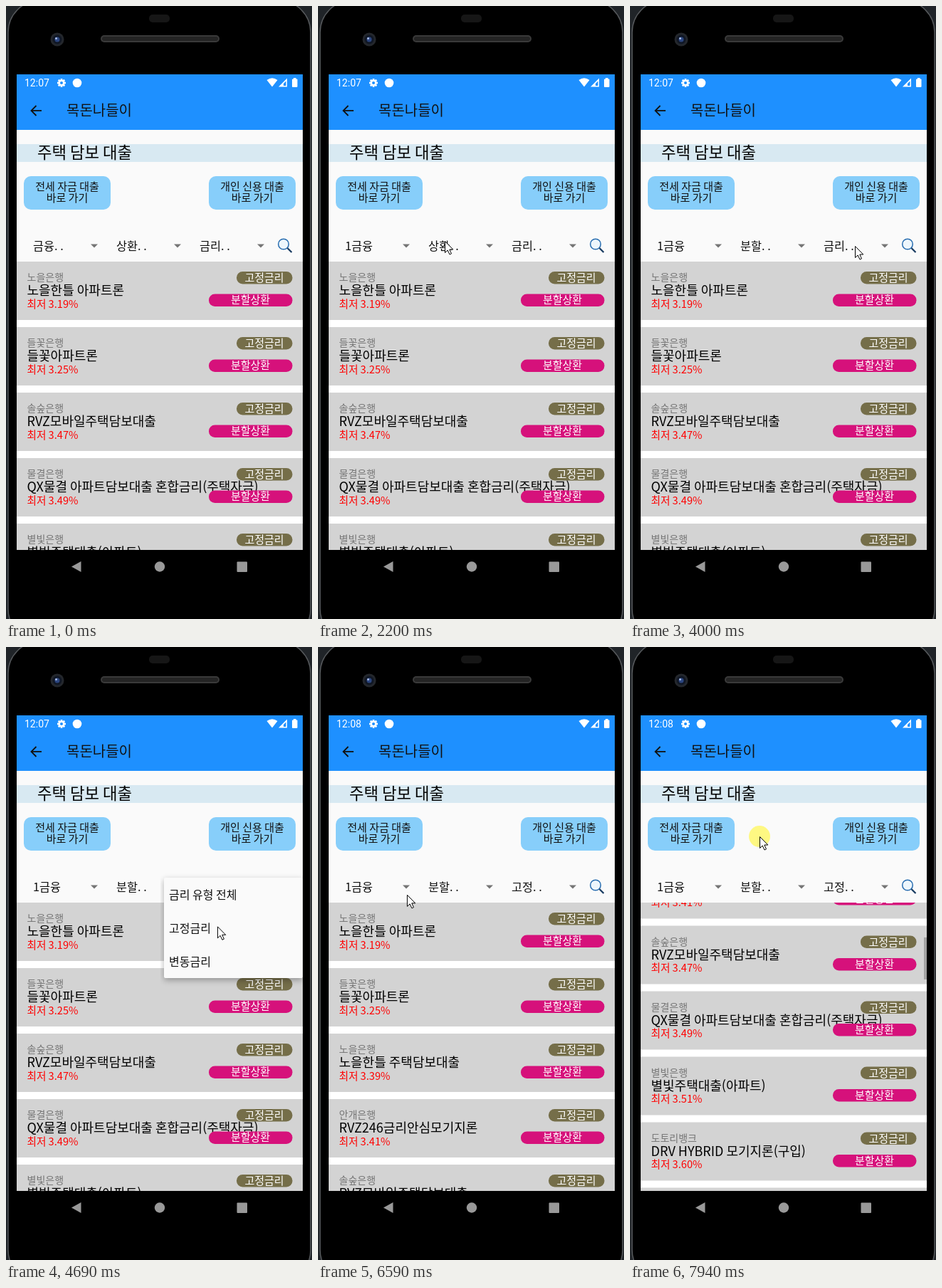
Write an HTML page with a canvas that moves like this. It is 430x861 px and loops after 8000 ms.

```html
<!DOCTYPE html>
<html lang="ko">
<head>
<meta charset="utf-8">
<style>
html, body { margin: 0; width: 100%; height: 100%; overflow: hidden; background: #000; }
canvas { display: block; }
</style>
</head>
<body>
<canvas id="stage" width="430" height="861"></canvas>
<script>
const c = document.getElementById('stage').getContext('2d');
const LOOP = 8000, STEP = 69;
const KOREAN = '"Noto Sans CJK KR", "Noto Sans CJK", sans-serif';
const ROW = 92, LIST_TOP = 359, SCREEN_BOTTOM = 764;

// Cursor tip: time, x, y
const PATH = [
  [70, 354, 762], [560, 108, 327], [760, 106, 328], [900, 81, 329], [1240, 81, 329],
  [1520, 60, 400], [1930, 60, 402], [2130, 178, 330], [2550, 178, 330], [2900, 156, 396],
  [3100, 153, 398], [3300, 153, 398], [3800, 316, 337], [4250, 316, 337], [4760, 296, 395],
  [4830, 292, 395], [5240, 292, 395], [5510, 368, 346], [5720, 387, 338], [6130, 387, 338],
  [6590, 121, 348], [6680, 120, 346], [6950, 88, 400], [7480, 166, 514], [7550, 167, 514],
  [7940, 182, 266]
];
const PRESSES = [[830, 1100], [1790, 1930], [2270, 2410], [3100, 3240], [4070, 4210],
  [5100, 5240], [5920, 6060], [7550, 8000]];

const SPINNERS = [
  { x: 30, left: 30, width: 192, before: '금융. .', after: '1금융', open: 1100, close: 1930,
    items: ['금융 유형 전체', '1금융', '2금융'] },
  { x: 147, left: 147, width: 215, before: '상환. .', after: '분할. .', open: 2410, close: 3240,
    items: ['상환 유형 전체', '분할상환', '만기일시상환'] },
  { x: 264, left: 222, width: 195, before: '금리. .', after: '고정. .', open: 4210, close: 5380,
    items: ['금리 유형 전체', '고정금리', '변동금리'] }
];

const LOANS = {
  sunset: ['노을은행', '노을한틀 아파트론', '3.19'],
  flower: ['들꽃은행', '들꽃아파트론', '3.25'],
  sunsetHome: ['노을은행', '노을한틀 주택담보대출', '3.39'],
  mist: ['안개은행', 'RVZ246금리안심모기지론', '3.41'],
  pine: ['솔숲은행', 'RVZ모바일주택담보대출', '3.47'],
  wave: ['물결은행', 'QX물결 아파트담보대출 혼합금리(주택자금)', '3.49'],
  star: ['별빛은행', '별빛주택대출(아파트)', '3.51'],
  acorn: ['도토리뱅크', 'DRV HYBRID 모기지론(구입)', '3.60']
};
const { sunset, flower, sunsetHome, mist, pine, wave, star, acorn } = LOANS;
const ALL = [sunset, flower, pine, wave, star];
const FILTERED = [sunset, flower, sunsetHome, mist, pine, wave, star, acorn, sunset];

const clamp = v => Math.max(0, Math.min(1, v));
const ramp = (t, start, length) => clamp((t - start) / length);
const smooth = p => p * p * (3 - 2 * p);

function rect(x, y, w, h, color) {
  c.fillStyle = color;
  c.fillRect(x, y, w, h);
}
function pill(x, y, w, h, r, color) {
  c.fillStyle = color;
  c.beginPath();
  c.roundRect(x, y, w, h, r);
  c.fill();
}
function disc(x, y, r, color) {
  c.fillStyle = color;
  c.beginPath();
  c.arc(x, y, r, 0, 7);
  c.fill();
}
function poly(points, fill, stroke) {
  c.beginPath();
  for (let i = 0; i < points.length; i += 2) c.lineTo(points[i], points[i + 1]);
  c.closePath();
  c.fillStyle = fill;
  c.fill();
  if (stroke) { c.strokeStyle = stroke; c.lineWidth = 1; c.stroke(); }
}
function line(points, color, width) {
  c.beginPath();
  for (let i = 0; i < points.length; i += 2) c.lineTo(points[i], points[i + 1]);
  c.strokeStyle = color;
  c.lineWidth = width;
  c.stroke();
}
// y is the vertical middle of the glyphs
function text(s, x, y, size, color = '#000', align = 'left', family = KOREAN) {
  c.font = `${size}px ${family}`;
  c.textAlign = align;
  c.fillStyle = color;
  c.fillText(s, x, y + size * 0.36);
}

function drawPhone() {
  rect(0, 0, 430, 861, '#202428');
  pill(3, -8, 425, 900, 45, '#000');
  c.strokeStyle = '#55585b';
  c.lineWidth = 1.5;
  c.stroke();
  pill(201, 12, 29, 11, 5, '#161616');
  pill(133, 41, 167, 10, 5, '#3a3a3a');
  pill(135, 43, 163, 6, 3, '#242424');
  disc(72, 47, 9.5, '#24272c');
  disc(72, 47, 6.5, '#101725');
  disc(72, 47, 3.5, '#2c4680');
  disc(70.5, 45.5, 1.5, '#a9bde8');
  poly([92, 787.5, 105.5, 780, 105.5, 795], '#999');
  disc(216, 787.5, 7.2, '#999');
  pill(324.5, 780.5, 14.5, 14.5, 1, '#999');
}

function drawHeader(t) {
  rect(15, 96, 402, 78, '#1e90ff');
  text(t < 5170 ? '12:07' : '12:08', 26, 108, 14, '#fff', 'left', 'Roboto, sans-serif');
  for (let i = 0; i < 8; i++) {
    const a = i * Math.PI / 4;
    line([78, 108, 78 + 6 * Math.cos(a), 108 + 6 * Math.sin(a)], '#fff', 2.6);
  }
  disc(78, 108, 4.6, '#fff');
  disc(78, 108, 2, '#1e90ff');
  disc(100, 108, 6.3, '#fff');
  c.fillStyle = '#fff';
  c.beginPath();
  c.moveTo(374, 113.5);
  c.lineTo(366.5, 104);
  c.quadraticCurveTo(374, 98.5, 381.5, 104);
  c.fill();
  poly([383, 113.5, 395, 113.5, 395, 101.5], '#fff');
  poly([390, 112, 393.5, 112, 393.5, 105.5, 390, 109], '#1e90ff');
  pill(402, 102.5, 7.5, 11.5, 1, '#fff');
  rect(404, 101, 3.5, 2, '#fff');
  line([50, 147, 36, 147], '#111', 1.8);
  line([42.5, 140, 35.5, 147, 42.5, 154], '#111', 1.8);
  text('목돈나들이', 85, 147, 20, '#111');
}

function drawButton(x, label) {
  pill(x, 239, 122, 47, 10, '#87cefa');
  text(label, x + 61, 254, 15, '#111', 'center');
  text('바로 가기', x + 61, 270, 15, '#111', 'center');
}

function drawLoan([bank, name, rate], y) {
  rect(15, y, 402, 82, '#d3d3d3');
  text(bank, 29.5, y + 22, 14, '#757575');
  text(name, 29.5, y + 41, 18);
  text(`최저 ${rate}%`, 29.5, y + 59.5, 14.6, '#f00');
  pill(324, y + 14, 78.5, 17.5, 8.5, '#756e49');
  text('고정금리', 363, y + 23, 15, '#fff', 'center');
  pill(285, y + 45.5, 117.5, 17.5, 8.5, '#d6117b');
  text('분할상환', 343.5, y + 54, 15, '#fff', 'center');
}

function drawList(t) {
  const drag = smooth(ramp(t, 7550, 385));
  const scroll = 335.5 * drag;
  c.save();
  c.beginPath();
  c.rect(15, LIST_TOP, 402, SCREEN_BOTTOM - LIST_TOP);
  c.clip();
  rect(15, LIST_TOP, 402, 405, '#fff');
  (t < 6200 ? ALL : FILTERED).forEach((loan, i) => drawLoan(loan, LIST_TOP + i * ROW - scroll));
  if (drag > 0) rect(413, LIST_TOP + scroll * 0.1457, 4, 59, '#a3a3a3');
  c.restore();
}

function drawSpinner(s, t) {
  const ripple = t < s.open ? 0 : 1 - ramp(t, s.open + 100, 200);
  if (ripple) disc(s.x + 94, 336.5, 19.5, `rgba(0,0,0,${0.13 * ripple})`);
  text(t < s.close ? s.before : s.after, s.x + 8, 337, 16.3, '#111');
  poly([s.x + 89, 334.5, s.x + 99, 334.5, s.x + 94, 339.5], '#757575');
}

function drawSearch() {
  disc(390, 334.5, 7.3, '#edf6fc');
  c.strokeStyle = '#286db0';
  c.lineWidth = 1.5;
  c.stroke();
  line([395.5, 340, 401.5, 346], '#16395f', 2.2);
}

function drawPopup(s, t) {
  if (t < s.open || t > s.close + 154) return;
  const shown = ramp(t, s.open, 210);
  const alpha = shown * shown * (1 - ramp(t, s.close, 154));
  const top = 324, height = 141;
  c.save();
  c.globalAlpha = alpha;
  c.beginPath();
  c.rect(s.left - 5, top - 8, (s.width + 10) * (0.3 + 0.7 * shown), (height + 20) * (0.1 + 0.9 * shown));
  c.clip();
  c.shadowColor = 'rgba(0,0,0,.3)';
  c.shadowBlur = 8;
  c.shadowOffsetY = 3;
  pill(s.left, top, s.width, height, 2, '#fafafa');
  c.shadowColor = 'transparent';
  s.items.forEach((item, i) => text(item, s.left + 7, 348.5 + i * 47, 16, '#111'));
  c.restore();
}

function cursorAt(t) {
  const next = PATH.findIndex(k => k[0] > t);
  if (next < 0) return PATH[PATH.length - 1].slice(1);
  const [t0, x0, y0] = PATH[next - 1], [t1, x1, y1] = PATH[next];
  const p = smooth(ramp(t, t0, t1 - t0));
  return [x0 + (x1 - x0) * p, y0 + (y1 - y0) * p];
}

function drawCursor(t) {
  if (t < PATH[0][0]) return;
  const [x, y] = cursorAt(t);
  if (PRESSES.some(([down, up]) => t >= down && t < up)) disc(x, y, 15, 'rgba(255,247,90,.75)');
  c.save();
  c.translate(x + 0.5, y + 0.5);
  poly([0, 0, 0, 16, 3.7, 12.5, 6.5, 18.5, 9, 17.3, 6.3, 11.5, 11.3, 11.5], '#fff', '#000');
  c.restore();
}

function draw(t) {
  drawPhone();
  rect(15, 96, 402, 668, '#fafafa');
  drawHeader(t);
  rect(15, 194, 402, 25, '#d8e9f2');
  text('주택 담보 대출', 44, 206, 22.3);
  drawButton(25, '전세 자금 대출');
  drawButton(285, '개인 신용 대출');
  drawList(t);
  SPINNERS.forEach(s => drawSpinner(s, t));
  drawSearch();
  SPINNERS.forEach(s => drawPopup(s, t));
  drawCursor(t);
}

const start = performance.now();
function frame() {
  const t = (performance.now() - start) % LOOP;
  draw(Math.floor((t + 5) / STEP) * STEP + 2);
  requestAnimationFrame(frame);
}
frame();
</script>
</body>
</html>
```
